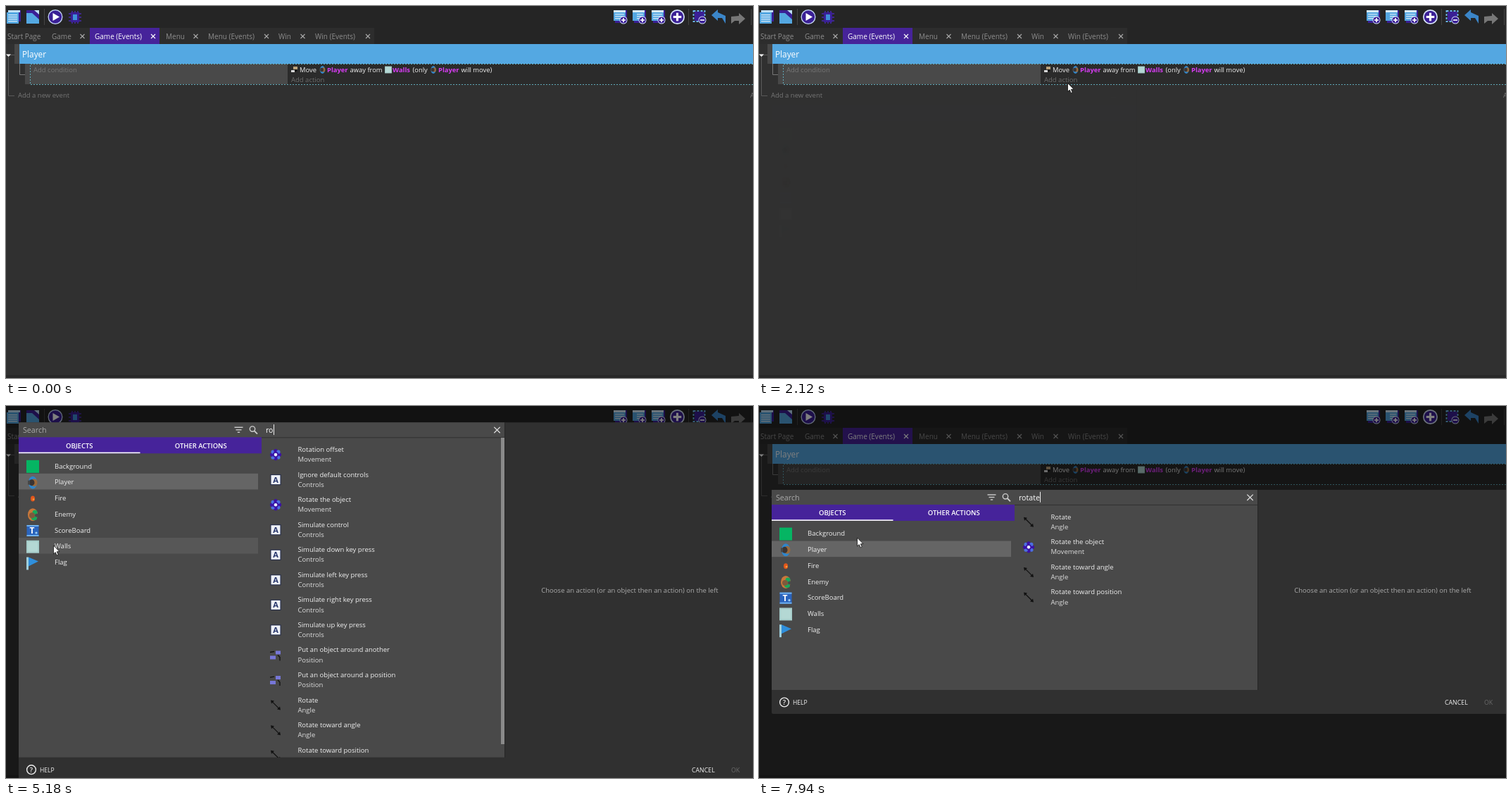
Recreate the animation shown at these times as an HTML page with a canvas. Size 1061 by 528 pixels, loop 7990 ms.

```html
<!DOCTYPE html>
<html lang="en">
<head>
<meta charset="utf-8">
<title>Event editor</title>
<style>
html, body { margin: 0; width: 100%; height: 100%; overflow: hidden; background: #303030; }
canvas { display: block; }
</style>
</head>
<body>
<canvas id="stage" width="1061" height="528"></canvas>
<script>
const g = document.getElementById('stage').getContext('2d');
const LOOP = 7990, OPEN = 2120, PICK = 3680, SHRINK = 5280;
const PURPLE = '#46239a', BLUE = '#54a8e2', INDIGO = '#3a1f96';
const ROW = 22.77;

const clamp = v => Math.max(0, Math.min(1, v));
const smooth = v => v * v * (3 - 2 * v);

function rect(color, x, y, w, h) {
  g.fillStyle = color;
  g.fillRect(x, y, w, h);
}
function trace(p) {
  g.beginPath();
  for (let i = 0; i < p.length; i += 2) g.lineTo(p[i], p[i + 1]);
}
function line(color, width, ...p) {
  trace(p);
  g.strokeStyle = color;
  g.lineWidth = width;
  g.stroke();
}
function poly(color, ...p) {
  trace(p);
  g.fillStyle = color;
  g.fill();
}
function oval(color, x, y, rx, ry = rx) {
  g.beginPath();
  g.ellipse(x, y, rx, ry, 0, 0, 7);
  g.fillStyle = color;
  g.fill();
}
function ring(color, width, x, y, r) {
  g.beginPath();
  g.arc(x, y, r, 0, 7);
  g.strokeStyle = color;
  g.lineWidth = width;
  g.stroke();
}
// y is the middle of the capitals
function text(s, x, y, size = 9.5, color = '#f0f0f0', weight = 400, align = 'left') {
  g.font = `${weight} ${size}px "Open Sans", "Noto Sans", sans-serif`;
  g.textAlign = align;
  g.fillStyle = color;
  g.fillText(s, x, y + size * .36);
  return g.measureText(s).width;
}
function at(x, y, draw, scale = 1) {
  g.save();
  g.translate(x, y);
  g.scale(scale, scale);
  draw();
  g.restore();
}
function cross(x, y, r, color, width) {
  line(color, width, x - r, y - r, x + r, y + r);
  line(color, width, x - r, y + r, x + r, y - r);
}

// ---- toolbar ----
function page(x, columns) {
  rect(INDIGO, x - 7, 6, 17, 18);
  rect(BLUE, x - 9, 6, 17, 15);
  rect('#d8ecfb', x - 9, 6, 17, 3);
  for (let i = 0; i < 3; i++) rect('#cfe6f8', x - 7 + columns, 11 + i * 3, 13 - columns, 1.3);
}
function badge(x, y, r, minus) {
  oval('#d9e6fa', x, y, r);
  oval(INDIGO, x, y, r * .84);
  rect('#fff', x - r * .55, y - r * .15, r * 1.1, r * .3);
  if (!minus) rect('#fff', x - r * .15, y - r * .55, r * .3, r * 1.1);
}
function toolbar() {
  rect('#252525', 0, 0, 1061, 54);
  rect(INDIGO, 4, 6, 17, 16);
  rect(BLUE, 1, 9, 17, 16);
  rect('#bfe0f8', 3, 6, 17, 3);
  for (let i = 0; i < 4; i++) rect('#d5eafa', 3, 12 + i * 3, 13, 1.3);

  rect(BLUE, 29, 9, 18, 16);
  poly(INDIGO, 29, 6, 47, 6, 47, 19, 37, 10, 29, 10);
  poly('#bfe0f8', 40, 6, 47, 6, 47, 12);

  oval('#c9dcf8', 70, 15.5, 10.5);
  oval(INDIGO, 70, 15.5, 9.2);
  poly('#fff', 66.5, 10, 76, 15.5, 66.5, 21);

  for (let i = -1; i < 2; i++) {
    line('#452aa6', 1.6, 89, 16 + i * 5, 107, 16 + i * 5);
    line('#452aa6', 1.6, 98 + i * 4, 7, 98 + i * 4, 25);
  }
  rect(INDIGO, 92, 9, 12, 14);
  rect('#3f8fd8', 95, 12, 6, 8);

  page(872, 0);
  page(899, 4);
  page(926, 0);
  for (const x of [877, 904, 931]) badge(x, 20, 5.5);
  badge(953.5, 15.5, 10.5);
  rect(INDIGO, 978, 8, 14, 13);
  g.setLineDash([3, 2]);
  g.strokeStyle = '#6db8ee';
  g.lineWidth = 1.8;
  g.strokeRect(976.5, 7, 16, 15);
  g.setLineDash([]);
  badge(989, 20, 5.5, true);
  poly('#3b86c9', 1002, 13, 1011, 5, 1011, 9, 1022, 14, 1022, 25, 1017, 17, 1011, 17, 1011, 21);
  poly('#777', 1050, 18, 1041, 10, 1041, 14, 1030, 15, 1030, 25, 1035, 21, 1041, 21, 1041, 26);
  for (const x of [54, 969, 1058]) rect('#454545', x, 4, 1, 23);
}

const TABS = [['Start Page', 2, 0], ['Game', 65, 108.5], ['Game (Events)', 126, 209], ['Menu', 227, 269.5],
  ['Menu (Events)', 287, 370], ['Win', 387, 421.5], ['Win (Events)', 439, 514]];

function tabs() {
  rect('#2d2d2d', 0, 31, 523, 23);
  rect(PURPLE, 119, 31, 99, 23);
  TABS.forEach(([name, x, close], i) => {
    const active = i == 2;
    text(name, x, 43.5, 10, active ? '#fff' : '#8d8d8d');
    if (close) cross(close, 43, 3, active ? '#fff' : '#aaa', 1.1);
  });
}

// ---- object icons, drawn about their own middle ----
const ICONS = [
  () => rect('#05b563', -9, -9, 18, 18),
  () => {
    oval('#2f86cb', 0, 0, 6, 9);
    oval('#9b6a3c', 2, 0, 4.5, 5.5);
    oval('#3b3432', -1.5, 0, 4, 4.5);
    rect('#474747', -7, -3, 3, 6);
  },
  () => { oval('#e2571c', 0, 0, 3, 4); oval('#f2a03a', 1, 1, 1.3); },
  () => {
    oval('#c9783a', 0, 0, 7, 9);
    oval('#17a85a', 3, -3, 3.5);
    oval('#17a85a', 2, 5, 4, 3);
    oval('#7d5a3c', -1, 1, 4);
    oval('#4a4a4a', 6, 1, 3, 2.5);
  },
  () => {
    rect('#2a64bd', -8.5, -8, 17, 16);
    rect('#70b1ee', -8.5, -8, 17, 2);
    rect('#70b1ee', -8.5, 6, 17, 2);
    text('T', -1, 0, 12, '#fff', 700, 'center');
    oval('#9fd0f5', 5, 3, 1.6);
  },
  () => { rect('#a6cdca', -9, -9, 18, 18); rect('#b4d8d4', -7, -7, 14, 14); },
  () => { rect('#9fcfdc', -9, -8, 3, 18); poly('#2f8fdc', -6, -8, 8, -2, -6, 5); }
];
const OBJECTS = ['Background', 'Player', 'Fire', 'Enemy', 'ScoreBoard', 'Walls', 'Flag'];

const KINDS = {
  Movement() {
    for (let i = 0; i < 8; i++) {
      const a = i * Math.PI / 4;
      oval(i % 2 ? '#4c6fe0' : '#3b12a5', 5.5 * Math.cos(a), 5.5 * Math.sin(a), 2.6);
    }
    oval('#3b12a5', 0, 0, 4);
    oval('#e6f0ff', 0, 0, 2.3);
  },
  Controls() {
    rect('#1e2748', -7.5, -7.5, 15, 15);
    rect('#eef1f7', -6.5, -6.5, 13, 13);
    text('A', 0, 0, 11, '#26356b', 700, 'center');
  },
  Position() {
    rect('#7777d8', -8, 1, 8, 5);
    rect('#7777d8', 0, -6, 7, 5);
    line('#111', 1.3, -8, -4, -2, -5);
    line('#111', 1.3, 3, 0, 6, 3, 6, 8);
  },
  Angle() {
    line('#111', 1.3, -5, -5, 5, 5);
    poly('#111', -7, -7, -2, -6, -6, -2);
    poly('#111', 7, 7, 2, 6, 6, 2);
  },
  Hand() {
    oval('#3460b8', 1, -3, 4.5);
    oval('#86b6f0', 0, -4, 2);
    poly('#f1d7bd', 1, -2, 3, -2, 4, 2, 8, 3, 7, 8, 2, 8, -1, 3, 1, 3);
  },
  Toward() {
    oval('#3460b8', -4, 3, 4);
    poly('#e4dfdc', -6, 5, 2, 4, 2, 8, -7, 8);
    line('#111', 1.5, 0, 0, 6, -6);
    poly('#111', 8, -8, 7, -3, 3, -7);
  }
};

// Headings start with "#"; a trailing key names the icon
const ALL = ['#FIRE BULLET', 'Fire a bullet', '#MOVEMENT',
  ...['Acceleration', 'Diagonal movement', 'Rotation offset', 'Angular maximum speed', 'Deceleration',
    'Maximum speed', 'Rotate the object'].map(s => s + '|Movement'),
  'Add a force (angle)|Hand', 'Add a force to move toward an object|Toward',
  'Add a force to move toward a position|Hand', 'Add a force|Hand', 'Stop the object', '#CONTROLS',
  ...['Ignore default controls', 'Simulate control', 'Simulate down key press',
    'Simulate left key press'].map(s => s + '|Controls')];

const FOUND = ['Rotation offset|Movement', 'Ignore default controls|Controls', 'Rotate the object|Movement',
  ...['control', 'down key press', 'left key press', 'right key press', 'up key press']
    .map(s => `Simulate ${s}|Controls`),
  'Put an object around another|Position', 'Put an object around a position|Position',
  'Rotate|Angle', 'Rotate toward angle|Angle', 'Rotate toward position|Angle'];

function results(query) {
  if (query.length < 3) return FOUND;
  if (query == 'rotate') return [10, 2, 11, 12].map(i => FOUND[i]);
  return FOUND.filter(s => s.startsWith('Rotat'));
}

// ---- event sheet ----
function sheet() {
  rect('#303030', 0, 0, 1061, 528);
  toolbar();
  tabs();
  line('#5a5a5a', 1, 3.5, 70, 3.5, 127.5, 12, 127.5);
  line('#5a5a5a', 1, 3.5, 69.5, 12, 69.5);
  line('#777', 1, 19.5, 82, 19.5, 97.5, 27, 97.5);
  poly('#fff', 0, 68.5, 7, 68.5, 3.5, 72);
  rect('#484848', 12, 54, 7, 28);
  rect(BLUE, 19, 54, 1042, 28);
  text('Player', 23, 68.5, 11.8, '#fff');

  rect('#484848', 27, 82, 7, 29);
  rect('#494949', 34, 82, 366, 29);
  rect('#2b2b2b', 400, 82, 661, 29);
  g.setLineDash([2, 2]);
  line('#5fa9b8', 1, 1061, 82.5, 34.5, 82.5, 34.5, 111.5, 1061, 111.5);
  g.setLineDash([]);
  text('Add condition', 39, 90.5, 9.5, '#777');
  text('Add action', 405, 105, 9.5, '#6c6c6c');
  text('Add a new event', 17, 127, 9.5, '#747474');
  text('A', 1057, 127, 9.5, '#747474');

  rect('#b9a27c', 408, 86, 6, 4);
  rect('#d8d8d8', 405, 91, 5, 3);
  rect('#111', 410, 90, 3, 3);
  const words = [['Move', 417], ['Player', 456, 1], ['away from', 488.5], ['Walls', 549, 1],
    ['(only', 577.5], ['Player', 614, 1], ['will move)', 646.5]];
  for (const [s, x, name] of words) text(s, x, 90.5, 9.4, name ? '#d63df2' : '#f0f0f0', name ? 700 : 400);
  for (const x of [449.5, 607]) at(x, 90.5, ICONS[1], .6);
  at(543, 90.5, ICONS[5], .55);
  rect('#282828', 0, 524, 1061, 4);
}

// ---- dialog ----
function magnifier(x, y) {
  ring('#ccc', 1.4, x - 1.5, y - 1.5, 3.7);
  line('#ccc', 1.8, x + 1.2, y + 1.2, x + 5.5, y + 5.5);
}
function caret(x, y) {
  rect('#eee', Math.round(x), y - 8, 1, 15);
}

const TYPED = [[4980, 'r'], [5130, 'ro'], [5280, 'rot'], [5440, 'rota'], [5740, 'rotat'], [6670, 'rotate']];
const HOVERS = [[2820, 3000, 0], [3000, PICK, 1], [PICK, SHRINK, 5]];
const CARET_OFF = [[2830, 3380], [4210, 4700], [6240, 6670], [7190, 7700]];

function actions(t, top, query, blink) {
  const y = top + 10.8;
  rect('#303030', 363, top + 21, 345, 1);
  let end = 369;
  if (query) {
    end += text(query, 369, y, 10.6, '#fff');
    cross(697.5, y, 4.2, '#ddd', 1.3);
  } else {
    text('Search Player actions', 369, y, 10.6, '#aaa');
    magnifier(697.5, y);
  }
  if (blink) caret(end, y);

  const tall = top < 100, bottom = tall ? 499 : 403;
  g.save();
  g.beginPath();
  g.rect(363, top + 22, 345, bottom - top - 22);
  g.clip();
  if (!query) ALL.forEach((entry, i) => {
    const [name, kind] = entry.split('|'), row = 61.3 + 22.7 * i;
    if (name[0] == '#') text(name.slice(1), 369, row, 8.1);
    else text(name, 414.5, row);
    if (kind && (kind != 'Controls' || t > 3780)) at(383, row, KINDS[kind]);
  });
  else results(query).forEach((entry, i) => {
    const [name, kind] = entry.split('|'), row = top + 38.3 + 35.55 * i;
    text(name, 414.5, row);
    text(kind, 414.5, row + 14.2, 9.5, '#ddd');
    at(383, row + 7.5, KINDS[kind]);
  });
  g.restore();
  if (tall) rect('#8a8a8a', 703, 45, 5, query ? 435 : 115);
}

function dialog(t) {
  const picked = t >= PICK, tall = picked && t < SHRINK;
  const top = tall ? 23.3 : 119, bottom = 556 - top, foot = bottom - 16;
  const split = picked ? 363 : 536, edge = picked ? 708 : 536, half = (split - 18) / 2;
  const search = top + 10.8, blink = !CARET_OFF.some(([a, b]) => t >= a && t < b);

  g.fillStyle = '#303030';
  g.beginPath();
  g.roundRect(18, top, 1060, bottom - top, 2);
  g.fill();
  rect('#494949', 18, top, edge - 18, bottom - 34 - top);
  rect('#272727', edge, top, 1, bottom - 34 - top);

  text('Search', 24, search, 10.7, '#aaa');
  if (!picked && blink && t > 2330) caret(23, search);
  [6, 4, 1.7].forEach((w, i) => rect('#ccc', split - 32.5 - w, search - 4.5 + i * 3.5, 2 * w, 1.4));
  magnifier(split - 11.5, search);

  rect(PURPLE, 18, top + 21, split - 18, 23);
  text('OBJECTS', 18 + half / 2, top + 32.8, 9.5, '#fff', 600, 'center');
  text('OTHER ACTIONS', 18 + half * 1.5, top + 32.8, 9.5, '#fff', 600, 'center');
  const ink = picked ? 259 - 86.5 * smooth(clamp((t - PICK) / 300)) : 259;
  rect('#fff', 18, top + 42.3, ink, 1.6);

  const first = top + 61.8, mark = (color, i) => rect(color, 18, first + i * ROW - 12, split - 23, 22.6);
  for (const [from, to, row] of HOVERS) if (t >= from && t < to) {
    g.save();
    g.globalAlpha *= clamp((t - from) / 200);
    mark('#575757', row);
    g.restore();
  }
  if (picked) mark('#656565', 1);
  OBJECTS.forEach((name, i) => {
    at(38, first + i * ROW + .8, ICONS[i]);
    text(name, 69, first + i * ROW);
  });

  if (picked) {
    const typed = TYPED.filter(k => t >= k[0]).pop();
    actions(t, top, typed ? typed[1] : '', blink);
  }
  text('Choose an action (or an object then an action) on the left', (edge + 1064) / 2, 261.5, 9.53, '#aaa', 400, 'center');

  ring('#eee', 1.4, 36, foot - .5, 6.4);
  text('?', 36, foot - .5, 9.5, '#eee', 600, 'center');
  text('HELP', 48, foot, 8.6);
  text('CANCEL', 974, foot, 8.8);
  text('OK', 1030, foot, 8.8, '#6a6a6a');
}

// ---- pointer ----
const PATH = [[410, 931, 482], [1200, 452, 122], [1970, 438, 109.5], [2230, 438, 109.5], [2850, 113, 167],
  [3180, 67, 198], [7690, 67, 198], [7940, 139, 187], [LOOP, 139, 187]];

function pointer(t) {
  if (t < PATH[0][0]) return;
  const i = PATH.findIndex(p => p[0] > t), [t0, x0, y0] = PATH[i - 1], [t1, x1, y1] = PATH[i];
  const k = smooth((t - t0) / (t1 - t0));
  at(x0 + (x1 - x0) * k, y0 + (y1 - y0) * k, () => {
    const shape = [.5, 0, .5, 12, 3.2, 9.6, 5.2, 14, 7.2, 13, 5.3, 8.8, 9, 8.6, .5, 0];
    poly('#fff', ...shape);
    line('#111', .8, ...shape);
  });
}

function frame(now) {
  const t = now % LOOP;
  sheet();
  if (t >= OPEN) {
    const shown = clamp((t - OPEN) / 210);
    g.globalAlpha = shown;
    rect('rgba(0,0,0,.5)', 0, 0, 1061, 528);
    dialog(t);
    g.globalAlpha = 1;
  }
  pointer(t);
  requestAnimationFrame(frame);
}
requestAnimationFrame(frame);
</script>
</body>
</html>
```
